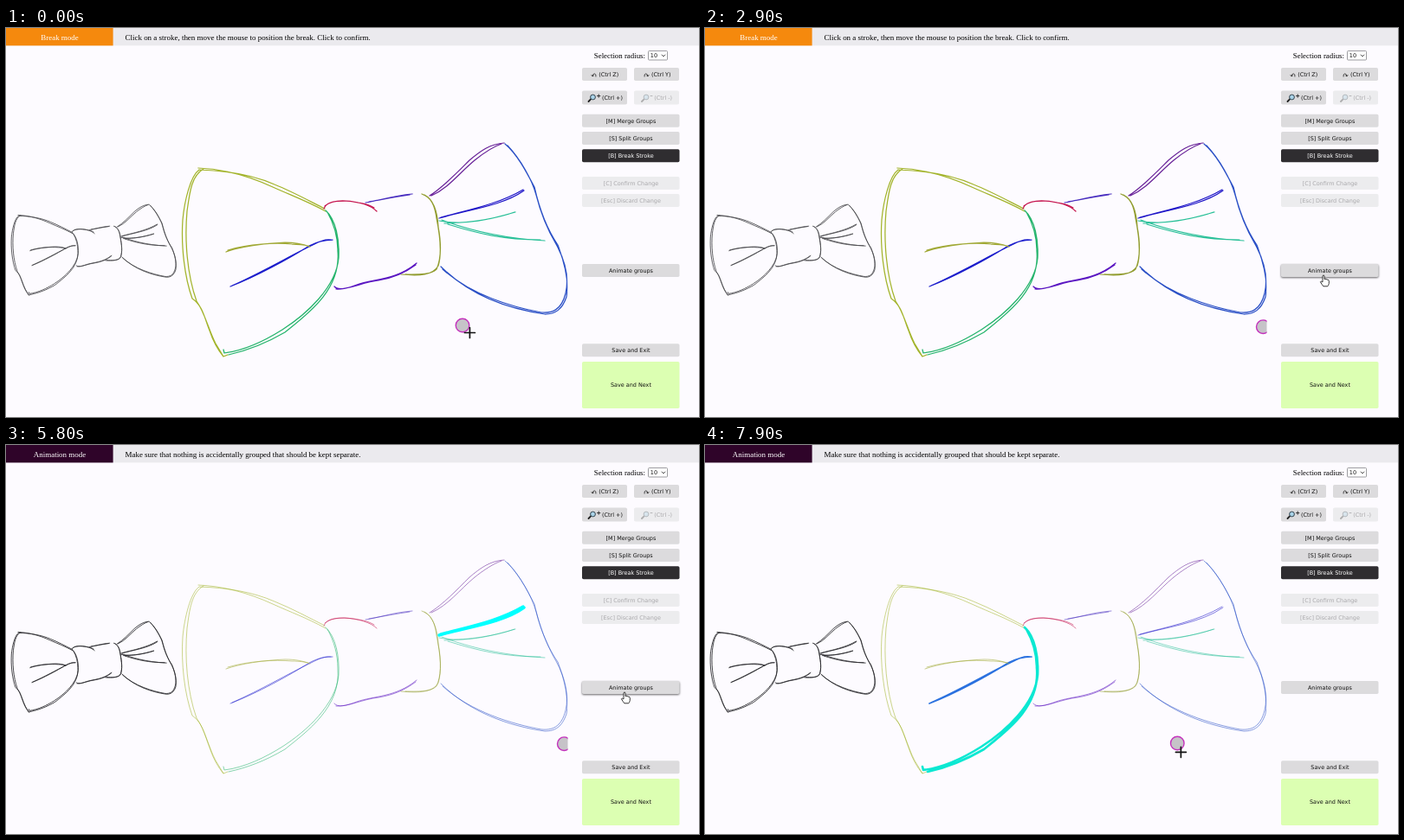
Recreate the animation shown at these times as an HTML page. Size 800 px wide and 450 px high, loop 8 s.

```html
<!DOCTYPE html>
<html lang="en">
<head>
<meta charset="utf-8">
<title>Stroke grouping tool</title>
<style>
  html, body { margin: 0; width: 100%; height: 100%; overflow: hidden; background: #fdfbff; }
  svg { display: block; width: 800px; height: 450px; }
  text { font: 6.45px "DejaVu Sans", sans-serif; fill: #111; }
  .serif { font: 8.96px "Liberation Serif", serif; fill: #000; }
  .mid { text-anchor: middle; }
  .line { fill: none; stroke-linecap: round; stroke-linejoin: round; }
  .btn { fill: #dcdbdd; }
  .dark .btn { fill: #2f2d30; }
  .dark text { fill: #fff; }
  .off .btn { fill: #ececee; }
  .off text { fill: #a9a8ab; }
  .off .icon { opacity: .3; }
  .next .btn { fill: #dcffb2; }
  .hover .btn { filter: drop-shadow(0 1px 1.3px #0009); }
</style>
</head>
<body>
<svg id="stage" viewBox="0 0 800 450">
  <defs>
    <clipPath id="canvas"><rect x="198" y="21" width="450.5" height="429"/></clipPath>
  </defs>
  <rect width="800" height="450" fill="#fdfbff"/>
  <rect width="800" height="20.4" fill="#ebeaee"/>
  <rect id="badge" width="123.6" height="20.4"/>
  <text id="mode" class="serif mid" x="62" y="13.6" style="fill:#fff"></text>
  <text id="hint" class="serif" x="137.5" y="13.6"></text>

  <text class="serif" x="678.8" y="34.7" style="font-size:8.85px">Selection radius:</text>
  <rect x="741.5" y="26.5" width="22" height="10.5" rx="1" fill="#fff" stroke="#85848a" stroke-width=".8"/>
  <text x="743.8" y="34.3">10</text>
  <path class="line" d="M757 31l2 2l2-2" stroke="#333" stroke-width=".8"/>

  <g id="panel"></g>
  <g id="thumb" class="line" transform="translate(-81 147.6) scale(.428 .425)"></g>
  <g id="sketch" class="line" clip-path="url(#canvas)"></g>
  <g clip-path="url(#canvas)">
    <circle id="brush" r="7.8" fill="#c6c3c8" stroke="#c432bd" stroke-width="1.4"/>
  </g>
  <g id="cursor">
    <path id="cross" class="line" d="M-6 0H6M0-6V6" stroke="#111" stroke-width="1.7"/>
    <path id="arrow" d="M0 0V9.2L2.2 7.2L3.8 10.7L5.3 10L3.8 6.7H6.6Z" fill="#fff" stroke="#222" stroke-width=".8"/>
    <path id="hand" d="M-1 1.2Q0 -.4 1 1.2V5Q2.2 4.2 3 5.3Q4.2 4.8 4.8 5.9Q6.2 5.6 6.3 7V10Q5.8 12 4.8 13.3H-.2Q-2 11 -3.6 8.2Q-3.2 6.8 -1 8.4Z" fill="#fff" stroke="#222" stroke-width=".9"/>
  </g>
</svg>
<script>
const LOOP = 8000, STEP = 100, ANIMATE_AT = 3100;
const $ = id => document.getElementById(id);
const clamp = x => Math.max(0, Math.min(1, x));

function add(parent, tag, attrs, text = '') {
  const el = document.createElementNS('http://www.w3.org/2000/svg', tag);
  for (const k in attrs) el.setAttribute(k, attrs[k]);
  el.textContent = text;
  return parent.appendChild(el);
}

// Side panel
function button(label, y, { h = 15, x = 665, w = 112.5, type = '', tx = x + w / 2 + .2 } = {}) {
  const g = add($('panel'), 'g', { class: type });
  add(g, 'rect', { class: 'btn', x, y, width: w, height: h, rx: 1.8 });
  add(g, 'text', { class: 'mid', x: tx, y: y + h / 2 + 2.4 }, label);
  return g;
}

function turnIcon(g, x, flip) {
  add(g, 'path', {
    class: 'line', stroke: '#222', 'stroke-width': .8,
    d: 'M-2 1.4Q-1.6 -1.4 .4 -1.4Q2.4 -1.2 2 1.8M-3 .2L-2 1.6L-.6 .8',
    transform: `translate(${x} 54.3) scale(${flip ? -1 : 1} 1)`
  });
}
function zoomIcon(g, x, sign) {
  const icon = add(g, 'g', { class: 'icon', transform: `translate(${x} 80.8)` });
  add(icon, 'path', { class: 'line', d: 'M-1.2 1.4L-4 4.2', stroke: '#222', 'stroke-width': 1.9 });
  add(icon, 'circle', { cx: 1, cy: -.8, r: 2.9, fill: '#a9d3e8', stroke: '#364650', 'stroke-width': 1 });
  add(icon, 'path', { class: 'line', d: sign, stroke: '#222', 'stroke-width': .9 });
}
turnIcon(button('(Ctrl Z)', 46, { w: 52, tx: 695.8 }), 679);
turnIcon(button('(Ctrl Y)', 46, { w: 52, x: 725, tx: 756.2 }), 739, true);
zoomIcon(button('(Ctrl +)', 72.5, { w: 52, h: 16, tx: 700 }), 676.5, 'M6-2.2H9.4M7.7-3.9V-.5');
zoomIcon(button('(Ctrl -)', 72.5, { w: 52, h: 16, x: 725, tx: 758.7, type: 'off' }), 738, 'M6-2.2H8');
button('[M] Merge Groups', 99.8);
button('[S] Split Groups', 120);
button('[B] Break Stroke', 140.2, { type: 'dark' });
button('[C] Confirm Change', 172, { type: 'off' });
button('[Esc] Discard Change', 192, { type: 'off' });
const animate = button('Animate groups', 273);
button('Save and Exit', 365.3);
button('Save and Next', 386, { h: 54, type: 'next' });

// Each group: colour and its sketchy, doubled pen lines
const groups = {
  outline: ['#a3b42b', `M368 209C350 200 330 189 310 181C285 170 255 165 223 164C213 171 206 200 204 222C202 252 206 288 215 313
    C227 321 229 335 235 350C240 365 246 374 251 380L256 378
    M369 212C345 199 330 194 308 184C280 171 250 163 222 162M228 163C214 171 212 190 209 212C206 245 209 285 220 316
    C230 330 234 350 242 365L251 380`],
  side: ['#25b46c', `M369 211C381 222 385 245 384 266C381 300 347 331 319 349C300 361 276 373 252 376L251 372
    M371 213C379 227 383 243 383 258C387 303 348 331 322 352C298 366 279 373 257 378`],
  red: ['#c5154f', `M367 209C370 201 380 200 391 200C406 201 421 205 428 212M368 206C376 199 392 199 407 202C415 203 422 206 425 208`],
  top: ['#4a30c0', `M415 202C430 200 445 194 469 192M419 201C436 198 452 195 466 193`],
  knot: ['#929d30', `M480 192C491 196 495 205 497 220C502 245 503 262 499 275C493 286 478 287 456 285
    M483 193C493 198 498 213 499 230C503 252 502 268 497 279C490 286 474 285 461 285`],
  bottom: ['#5b17c2', `M379 299C383 304 392 302 405 297C425 290 450 292 474 272M381 302C395 303 412 294 430 292C448 289 461 283 473 274`],
  fold: ['#1c1dcc', `M259 299C290 287 328 266 350 252C361 246 369 245 377 245M261 298C295 283 325 265 352 252C362 247 368 244 375 245`],
  crease: ['#a1a936', `M254 259C270 253 298 249 322 248C335 248 343 250 351 253M256 257C280 250 310 248 330 250C339 250 345 251 349 252`],
  edge: ['#692399', `M489 194C505 184 520 168 535 153C548 142 559 134 575 133M491 194C511 185 523 168 541 153C551 145 563 137 572 134`],
  wing: ['#2b50c6', `M576 134C590 146 600 165 610 184C617 215 626 235 637 251C645 272 650 295 647 311C642 326 634 331 622 331C580 325 535 309 502 276
    M579 136C594 152 607 175 612 193C618 217 628 238 635 250C646 270 650 290 646 307C641 327 630 330 618 329C585 323 537 309 504 279`],
  pleat: ['#1e15c8', `M500 220C530 211 573 206 598 188M502 219C535 210 568 204 597 187`],
  teal: ['#29c098', `M500 223C530 229 560 221 588 213M506 226C535 225 565 221 587 213
    M503 222C527 231 565 243 622 246M510 227C545 238 575 245 617 245`]
};
const lines = {};
for (const [name, [color, d]] of Object.entries(groups)) {
  lines[name] = add($('sketch'), 'path', { d });
  add($('thumb'), 'path', { d, 'stroke-width': 2 });
}

// Groups lit one after another, crossfading
const order = ['crease', 'bottom', 'teal', 'pleat', 'outline', 'side', 'fold'];
const FADE = 550, PERIOD = 830, FIRST_END = 3580;
const ramp = (t, start, length) => clamp((t - start) / length);
function glow(name, t) {
  const i = order.indexOf(name);
  if (i < 0) return 0;
  const end = FIRST_END + i * PERIOD;
  const rise = i ? ramp(t, end - PERIOD, FADE) : ramp(t, 3000, 300);
  return rise - ramp(t, end, FADE);
}

// Key points: time, x, y
const pointer = [
  [0, 535.4, 352.5], [500, 545, 355], [700, 545, 355], [1000, 562, 356], [1300, 640, 353], [1600, 678, 333.5],
  [2000, 701, 307], [2400, 714, 285.5], [6900, 714, 285.5], [7000, 712, 288], [7100, 704, 295],
  [7400, 680, 320], [7700, 622, 351], [7900, 549.4, 355.3], [8000, 525, 355]
];
const brush = [
  [0, 527, 344], [500, 537, 347], [700, 537, 347], [1000, 554, 348], [1400, 644.3, 345.7],
  [7500, 644.3, 345.7], [7700, 622, 345], [7900, 545.3, 345], [8000, 521, 345]
];
function along(keys, t) {
  const i = Math.max(1, keys.findIndex(k => k[0] >= t));
  const [a, b] = [keys[i - 1], keys[i]], p = clamp((t - a[0]) / (b[0] - a[0]));
  return [a[1] + (b[1] - a[1]) * p, a[2] + (b[2] - a[2]) * p];
}
const show = (id, on) => $(id).style.display = on ? '' : 'none';

function draw(t) {
  const on = t >= ANIMATE_AT;
  $('badge').setAttribute('fill', on ? '#2f0429' : '#f5890d');
  $('mode').textContent = on ? 'Animation mode' : 'Break mode';
  $('hint').textContent = on
    ? 'Make sure that nothing is accidentally grouped that should be kept separate.'
    : 'Click on a stroke, then move the mouse to position the break. Click to confirm.';
  $('thumb').setAttribute('stroke', on ? '#2b2b2e' : '#4b4b4e');

  for (const name in lines) {
    const h = on ? glow(name, t) : 0, s = lines[name].style;
    s.stroke = `color-mix(in srgb, #0ff ${h * 100}%, ${groups[name][0]})`;
    s.strokeWidth = on ? 1 + 2.4 * h : 1.25;
    s.opacity = on ? .55 + .45 * Math.min(1, h * 2.5) : 1;
  }

  const [x, y] = along(pointer, t), [bx, by] = along(brush, t);
  const inside = x < 648, over = x > 665 && x < 777 && y >= 273 && y <= 288;
  $('cursor').setAttribute('transform', `translate(${x} ${y})`);
  $('brush').setAttribute('transform', `translate(${bx} ${by})`);
  show('cross', inside);
  show('hand', over);
  show('arrow', !inside && !over);
  animate.setAttribute('class', over ? 'hover' : '');
}

const begin = performance.now();
function tick() {
  const t = (performance.now() - begin) % LOOP;
  draw(Math.floor(t / STEP) * STEP);
  requestAnimationFrame(tick);
}
tick();
</script>
</body>
</html>
```
